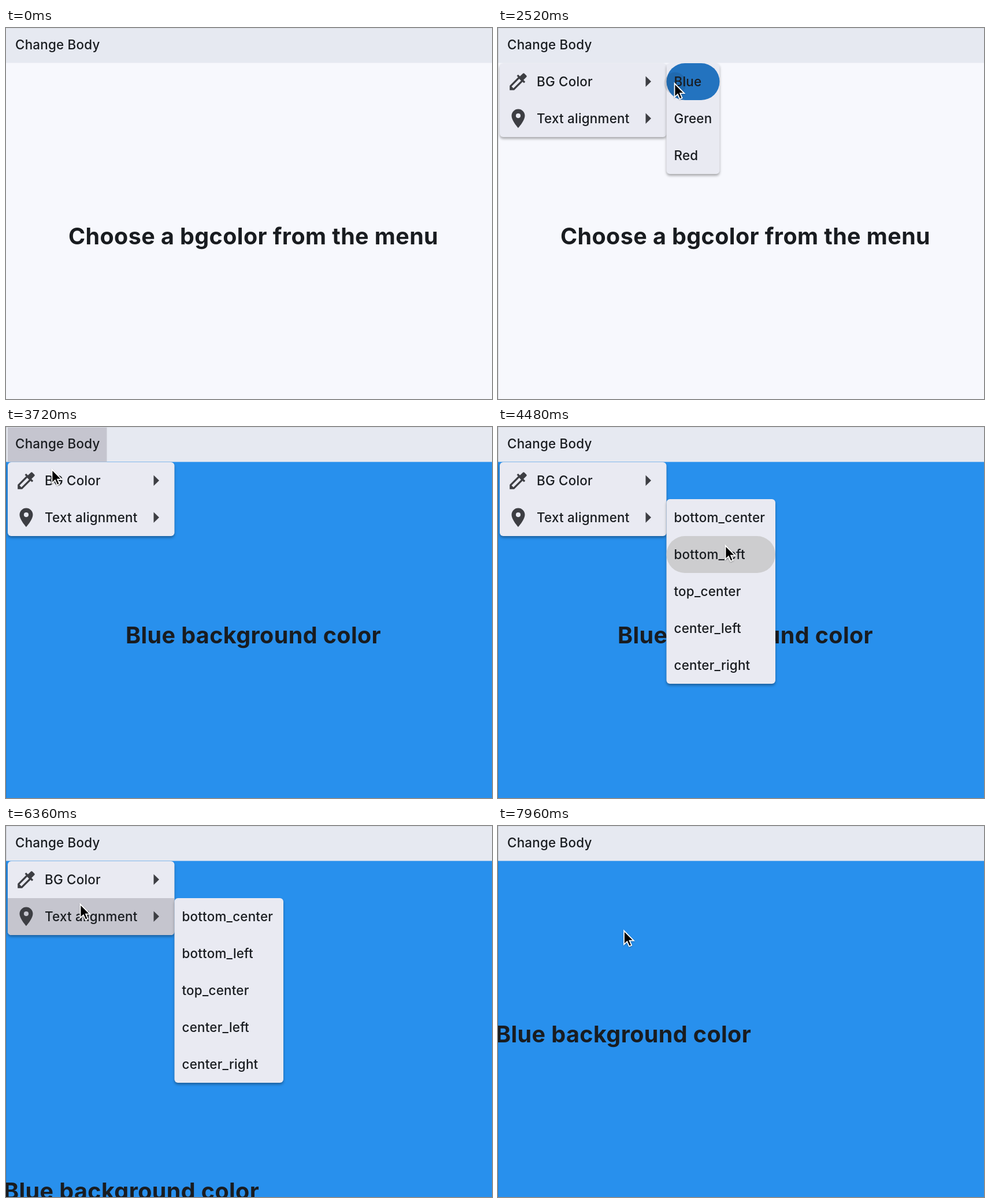
Write an HTML page that moves like this. It is 841 px wide and 643 px high and loops after 8 s.

```html
<!DOCTYPE html>
<html lang="en">
<head>
<meta charset="utf-8">
<title>Menu demo</title>
<style>
  html, body { margin: 0; height: 100%; overflow: hidden; }
  svg { display: block; width: 100vw; height: 100vh; }
  text { font: 500 22.4px Inter, sans-serif; letter-spacing: .22px; fill: #191c20; }
  .head { font-size: 39.5px; font-weight: 700; letter-spacing: .39px; }
  .panel { filter: drop-shadow(0 3px 2px rgba(0, 0, 0, .32)); }
</style>
</head>
<body>
<svg id="stage" viewBox="0 0 841 643"></svg>
<script>
const LOOP = 8000, STEP = 40, ROW = 64, TOP = 61, SUB_X = 291.5;
const CLICK_DELAY = 160, HOVER_DELAY = 50;
const stage = document.getElementById('stage');

const spots = {
  entry: [475, 305], idle: [381, 149], bar: [76.5, 30], under: [78.5, 72.5], bg: [140, 90],
  blue: [304.5, 95], align: [127.5, 134.5], bottomLeft: [392.5, 204.5],
  aside: [497, 200], centerLeft: [350, 340], exit: [217, 180.5]
};
// Pointer moves: start, duration, destination
const moves = [
  [40, 40, 'idle'], [280, 600, 'bar'], [1560, 360, 'bg'], [2040, 320, 'blue'],
  [2880, 440, 'bar'], [3600, 120, 'under'], [3720, 280, 'align'], [4360, 120, 'bottomLeft'],
  [4800, 280, 'aside'], [5240, 400, 'bar'], [5960, 400, 'align'],
  [6760, 320, 'centerLeft'], [7680, 240, 'exit']
];
const clicks = [1240, 2440, 3400, 4640, 5720, 7520];

const menu = [
  {
    label: 'BG Color', width: 92, items: ['Blue', 'Green', 'Red'],
    hover: ['#2373bf', '#43a047', '#d7413a'], body: ['#2890ed', '#4caf50', '#f44336'],
    icon: 'M20.7 5.6 18.4 3.3a1 1 0 0 0-1.4 0l-3.2 3.1-1.9-1.9-1.4 1.4 1.4 1.4L3 16.25V21h4.75l8.9-8.9 1.4 1.4 1.4-1.4-1.9-1.9 3.1-3.1a1 1 0 0 0 0-1.5zM6.9 19 5 17.1 13.1 9 15 10.9z'
  },
  {
    label: 'Text alignment', width: 188.5, hover: [],
    items: ['bottom_center', 'bottom_left', 'top_center', 'center_left', 'center_right'],
    icon: 'M12 2a7 7 0 0 0-7 7c0 5.25 7 13 7 13s7-7.75 7-13a7 7 0 0 0-7-7zm0 9.5a2.5 2.5 0 0 1 0-5 2.5 2.5 0 0 1 0 5z'
  }
];
const headX = { left: [-4, 'start'], center: [428, 'middle'], right: [845, 'end'] };
const headY = { top: 103, center: 375, bottom: 647 };

const rect = (x, y, w, h, fill, extra = '') =>
  `<rect x="${x}" y="${y}" width="${w}" height="${h}" fill="${fill}" ${extra}/>`;
const label = (x, y, s, extra = '') => `<text x="${x}" y="${y}" ${extra}>${s}</text>`;
const panel = (x, y, w, rows) => rect(x, y, w, rows * ROW, '#e9eaf2', 'rx="6" class="panel"');

function pointer(t) {
  if (t < moves[0][0]) return [999, 999];
  let [x, y] = spots.entry;
  for (const [start, ms, name] of moves) {
    const u = Math.min(1, Math.max(0, (t - start) / ms)), k = u * u * (3 - 2 * u);
    x += (spots[name][0] - x) * k;
    y += (spots[name][1] - y) * k;
  }
  return [x, y];
}

const mainRow = ([x, y]) => x < SUB_X ? Math.floor((y - TOP) / ROW) : -1;
const subRow = ([x, y], sub) =>
  x >= SUB_X && x < SUB_X + menu[sub].width ? Math.floor((y - TOP) / ROW) - sub : -1;

// Replay hovers and clicks up to time t
function replay(t) {
  const s = { open: false, sub: -1, fill: '#f7f8fd', heading: 'Choose a bgcolor from the menu', align: 'center_center' };
  for (let now = 0; now <= t; now += STEP) {
    const tip = pointer(now - HOVER_DELAY), row = mainRow(tip);
    if (s.open && menu[row]) s.sub = row;
    if (!clicks.includes(now - CLICK_DELAY)) continue;
    if (s.open) {
      const { items, body } = menu[s.sub], i = subRow(tip, s.sub);
      if (body) {
        s.fill = body[i];
        s.heading = items[i] + ' background color';
      } else s.align = items[i];
    }
    s.open = !s.open;
    s.sub = -1;
  }
  return s;
}

function mainMenu(row) {
  let out = panel(3, TOP, 288.5, menu.length);
  if (menu[row])
    out += rect(3, TOP + row * ROW, 288.5, ROW, '#c5c5ce', 'style="clip-path:inset(61px 549.5px 454px 3px round 6px);clip-path:view-box inset(61px 549.5px 454px 3px round 6px)"'.replace(/ style.*/, ''));
  menu.forEach((m, i) => {
    const mid = TOP + ROW / 2 + i * ROW;
    out += `<path transform="translate(15.3 ${mid - 19.7}) scale(1.64)" d="${m.icon}" fill="#3d3e43"/>`
      + label(67, mid + 8, m.label)
      + `<path d="M255.5 ${mid - 9.5}l9.5 9.3-9.5 9.3z" fill="#3d3e43"/>`;
  });
  return out;
}

function subMenu(sub, tip, ripple) {
  const { items, width, hover } = menu[sub], y = TOP + sub * ROW, row = subRow(tip, sub);
  let out = panel(SUB_X, y, width, items.length);
  if (items[row])
    out += rect(SUB_X, y + row * ROW, width, ROW, hover[row] || '#cdcdcf', 'rx="32"') + ripple;
  items.forEach((s, i) => out += label(304.5, y + 40 + i * ROW, s));
  return out;
}

function draw(t) {
  const { open, sub, fill, heading, align } = replay(t);
  const [v, h] = align.split('_'), [hx, anchor] = headX[h];
  const tip = pointer(t), hover = pointer(t - HOVER_DELAY);
  const click = clicks.find(c => t >= c && t < c + 240);
  const ripple = click
    ? `<circle cx="${tip[0] + 2}" cy="${tip[1] + 1}" r="${Math.min(30, (t - click) * .24)}" opacity=".09"/>` : '';

  let out = rect(0, 0, 841, 643, fill)
    + label(hx, headY[v], heading, `class="head" text-anchor="${anchor}"`)
    + rect(0, 0, 841, 60.5, '#e6e9f1') + rect(0, 0, 841, 1, '#d9dce3');
  if (hover[0] < 174 && hover[1] < TOP)
    out += rect(3, 1, 171.5, 59.5, open ? '#c5c5cf' : '#cfd0da') + ripple;
  out += label(16, 37, 'Change Body');
  if (t >= 280) out += rect(0, 0, 1, 643, '#000', 'opacity=".12"');
  if (open) out += mainMenu(mainRow(hover));
  if (sub >= 0) out += subMenu(sub, tip, ripple);
  stage.innerHTML = out
    + `<path transform="translate(${tip})" d="M1 1v23.8l5.4-5 3.6 8.3 4.2-1.8-3.6-8.2h7.2z" stroke="#fff" stroke-width="1.8" style="filter:drop-shadow(0 1px 1px rgba(0,0,0,.3))"/>`;
}

let last = -1;
function tick() {
  const t = Math.floor(performance.now() % LOOP / STEP) * STEP;
  if (t !== last) draw(last = t);
  requestAnimationFrame(tick);
}
tick();
</script>
</body>
</html>
```
